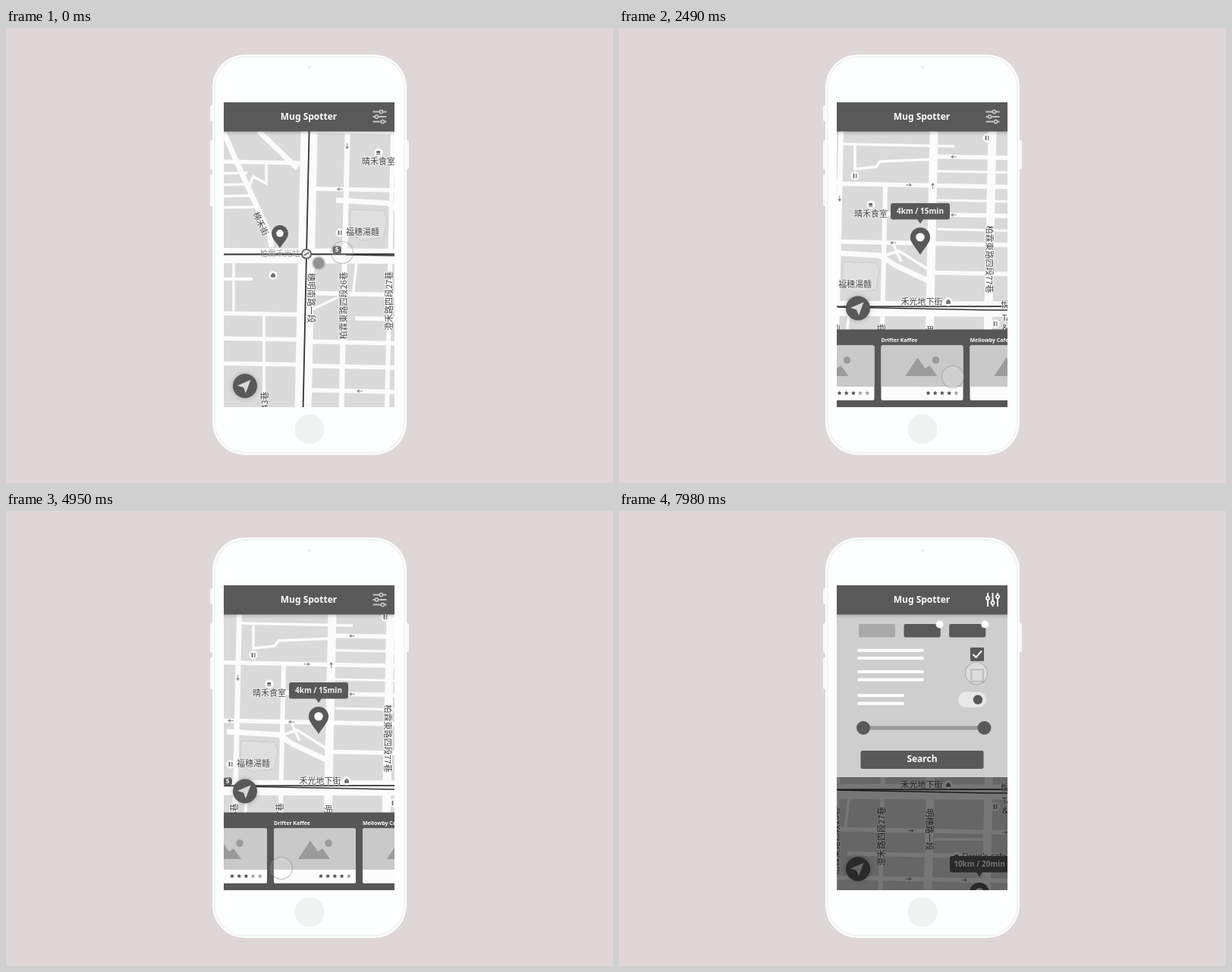
These frames come from a looping animation (800 by 600 pixels, 8000 ms). An HTML page with a canvas:

```html
<!DOCTYPE html>
<html lang="en">
<head>
<meta charset="utf-8">
<title>Cafe map</title>
<style>
html, body { margin: 0; width: 100%; height: 100%; overflow: hidden; background: #dfd6d7; }
canvas { display: block; width: 800px; height: 600px; }
</style>
</head>
<body>
<canvas id="stage" width="800" height="600"></canvas>
<script>
const ctx = document.getElementById('stage').getContext('2d');
const LOOP = 8000, DARK = '#595959', ROAD = '#fbfbfb';
const LATIN = '"Noto Sans", "Open Sans", sans-serif';
const CJK = '"Noto Sans CJK TC", "Noto Sans CJK JP", "Noto Sans CJK", sans-serif';
const RIGHT = 0, DOWN = Math.PI / 2, LEFT = Math.PI, UP = -DOWN;

// Map offset and left edge of the third card: [from, to, x, y, card]
const mapStart = [148, -41, 462.5];
const mapMoves = [
  [0, 680, -58, -18, 462.5],
  [820, 1350, 0, 0, 462.5],
  [1750, 2300, -11, 28, 462.5],
  [2600, 3200, -90, -177, 349],
  [4300, 4950, 4, 23, 470],
  [4950, 5150, -11, 28, 462.5]
];
// Finger: from, to, place, and whether it taps on arrival
const touchStart = [443, 296];
const touchMoves = [
  [0, 690, 328, 277],
  [690, 1300, 386, 295],
  [1300, 1620, 413, 258, 'tap'],
  [1800, 2400, 440, 460],
  [2700, 3200, 367, 468],
  [4300, 4850, 363, 471],
  [5000, 5700, 492, 118, 'tap'],
  [5900, 6550, 468, 166, 'tap'],
  [6720, 7000, 398, 160, 'tap'],
  [7120, 7620, 472, 189, 'tap'],
  [7740, 7960, 471, 214, 'tap']
];

const avenues = [
  { x: 248, width: 22 },
  { x: 298.5, width: 7, name: '柏霖東路四段26巷', nameY: 407, turn: UP, way: DOWN, arrows: [197] },
  { x: 358.5, width: 6, top: 178, name: '澄禾路四段27巷', nameY: 401, turn: UP },
  { x: 421, width: 11, name: '明穗路一段', nameY: 392, turn: DOWN, way: UP, arrows: [180, 510] },
  { x: 498, width: 11, name: '柏霖東路四段77巷', nameY: 277, turn: DOWN }
];
// Cross streets, counted away from the main road in both directions
const northStreets = [
  { from: 425, way: RIGHT, arrows: [536] },
  { from: 253, way: LEFT, arrows: [292, 372] },
  { from: 362, way: LEFT, arrows: [452] },
  { from: 248, way: RIGHT, arrows: [393] },
  { from: 428, way: LEFT, arrows: [452] }
];
const southStreets = [
  { from: 248, to: 560, way: RIGHT, arrows: [396, 520] },
  { from: 312 },
  { from: 248, way: RIGHT, arrows: [393, 466, 551] },
  { from: 248 },
  { from: 248, to: 493, way: LEFT, arrows: [318, 449] },
  { from: 377, way: RIGHT, arrows: [384, 566] }
];
const bends = new Path2D(`M139 179L162 231L199 312L202 330M185 177L236 226M287 268L355 272L375 285L420 306
  M560 397L587 429M563 397L566 492M600 495V580`);
const lanes = new Path2D(`M306 125L453 128M322 127V158L350 155L355 148L428 145M426 405H495M192 418V580M152 350V417
  M195 219V246L178 237L172 250M372 256L383 280M361 272L380 266L418 290M257 411L290 396M314 350L309 395`);
const garden = new Path2D('M306 280L350 282L354 292L350 317L320 321L305 312Z');

const places = [
  { kind: 'fork', x: 292, y: 311, name: '福穗湯麵', dx: 30, dy: -1 },
  { kind: 'cup', x: 343, y: 205, name: '晴禾食室', dx: 0, dy: 12 },
  { kind: 'shop', x: 445, y: 333, name: '禾光地下街', dx: -35, dy: 0 },
  { kind: 'shop', x: 541, y: 324, name: '悅彩名店城', dx: 1, dy: 13 },
  { kind: 'fork', x: 507, y: 362, name: 'TANSEL Cafe\n& Galettes', dx: 9, dy: -7 },
  { kind: 'cup', x: 456, y: 427, name: "Orrin's cafe", dx: 7, dy: 1 },
  { kind: 'fork', x: 322, y: 167 },
  { kind: 'fork', x: 496, y: 117 },
  { kind: 'fork', x: 548, y: 179 },
  { kind: 'shop', x: 204, y: 367 },
  { kind: 'shop', x: 588, y: 518 }
];
const cards = [['Moss Cafe', 3], ['Drifter Kaffee', 4], ['Mellowby Cafe', 4], ['Fenn Cafe', 4]];

const clamp = v => Math.max(0, Math.min(1, v));
const ease = v => v * v * (3 - 2 * v);
const mix = (a, b, k) => a + (b - a) * k;
const ramp = (t, from, to) => ease(clamp((t - from) / (to - from)));
const glide = (start, moves, t) => moves.reduce((pose, [from, to, ...goal]) =>
  pose.map((v, i) => mix(v, goal[i], ramp(t, from, to))), start);

const avenueX = (avenue, y) => avenue.x - (y - 340) * 0.022;
const northY = row => 294 - 38.3 * row;
const southY = row => 393.5 + 32 * row;
const slant = (y, x) => y + (x - 400) * 0.02;

function at(x, y, draw, angle = 0, scale = 1) {
  ctx.save();
  ctx.translate(x, y);
  ctx.rotate(angle);
  ctx.scale(scale, scale);
  draw();
  ctx.restore();
}
function box(x, y, w, h, r, fill) {
  ctx.beginPath();
  ctx.roundRect(x, y, w, h, r);
  ctx.fillStyle = fill;
  ctx.fill();
}
function disc(x, y, r, fill) {
  ctx.beginPath();
  ctx.arc(x, y, r, 0, 7);
  ctx.fillStyle = fill;
  ctx.fill();
}
function shape(points, fill) {
  ctx.beginPath();
  points.forEach(p => ctx.lineTo(...p));
  ctx.closePath();
  ctx.fillStyle = fill;
  ctx.fill();
}
function line(points, width, color) {
  ctx.beginPath();
  points.forEach(p => ctx.lineTo(...p));
  ctx.lineWidth = width;
  ctx.strokeStyle = color;
  ctx.stroke();
}
function strokePath(path, width, color) {
  ctx.lineWidth = width;
  ctx.strokeStyle = color;
  ctx.stroke(path);
}
function text(str, x, y, font, color, align = 'center') {
  ctx.font = font;
  ctx.textAlign = align;
  ctx.textBaseline = 'middle';
  ctx.fillStyle = color;
  ctx.fillText(str, x, y);
}

function drawPhone() {
  ctx.fillStyle = '#dfd6d7';
  ctx.fillRect(0, 0, 800, 600);
  [[269, 102, 21], [269, 148, 39], [269, 193, 42], [526, 148, 38]].forEach(([x, y, h]) => box(x, y, 5, h, 2, '#f8f8f8'));
  box(272, 35, 256, 528, 43, '#fdfefe');
  const rim = new Path2D();
  rim.roundRect(275, 38, 250, 522, 40);
  strokePath(rim, 2, '#f2f4f4');
  disc(400, 52, 2, '#ececec');
  disc(400, 529, 19.5, '#f0f1f1');
}

function drawArrow(x, y, angle) {
  at(x, y, () => {
    line([[-4, 0], [2, 0]], 1.1, '#999');
    shape([[0.5, -2.5], [4, 0], [0.5, 2.5]], '#8c8c8c');
  }, angle);
}
function mapLabel(str, x, y, angle = 0) {
  const latin = /[a-z]/.test(str);
  const font = `11px ${latin ? LATIN : CJK}`, align = latin ? 'left' : 'center';
  at(x, y, () => {
    ctx.font = font;
    ctx.textAlign = align;
    ctx.textBaseline = 'middle';
    ctx.lineWidth = 2;
    ctx.strokeStyle = 'rgba(250,250,250,.6)';
    ctx.strokeText(str, 0, 0);
    text(str, 0, 0, font, '#484848', align);
  }, angle);
}
function drawStreets() {
  const crossings = (rows, yOf) => rows.map((row, i) => ({ ...row, y: yOf(i) }));
  const streets = [...crossings(northStreets, northY), ...crossings(southStreets, southY)];
  const street = (y, from, to, width) => line([[from, slant(y, from)], [to, slant(y, to)]], width, ROAD);
  for (const { y, from, to = 610 } of streets) street(y, from, to, 5.7);
  for (let i = 1; i <= 3; i++) street(northY(i) - 19, 430, 610, 3);
  for (let i = 0; i < 4; i++) line([[130, 233 + 15 * i], [170 + 4 * i, 232 + 15 * i]], 3.5, ROAD);
  for (const y of [217, 417, 450, 483]) line([[130, y], [245, y + 2]], 5.5, ROAD);
  line([[130, 372], [177, 372]], 4, ROAD);
  strokePath(lanes, 3.5, ROAD);
  strokePath(bends, 7, ROAD);
  for (const a of avenues) {
    const top = a.top ?? 90;
    line([[avenueX(a, top), top], [avenueX(a, 580), 580]], a.width, ROAD);
  }
  line([[130, 341], [610, 343]], 20, ROAD);
  line([[130, 339.5], [610, 339]], 1.8, '#333');
  line([[300, 340], [500, 344], [610, 344.5]], 1.5, '#333');
  line([[avenueX(avenues[0], 90), 90], [avenueX(avenues[0], 580), 580]], 1.8, '#333');
  for (const { y, way, arrows = [] } of streets) arrows.forEach(x => drawArrow(x, slant(y, x), way));
  for (const a of avenues) a.arrows?.forEach(y => drawArrow(avenueX(a, y), y, a.way));
}
function drawPlace(kind) {
  disc(0, 0, 5.7, '#fafafa');
  const ink = '#686868';
  if (kind === 'fork') {
    line([[-1.5, -3], [-1.5, 3]], 1.8, ink);
    line([[1.8, -3], [1.8, 3]], 1.2, ink);
  } else if (kind === 'cup') {
    box(-2.8, -2, 5, 3.3, 1, ink);
    line([[-3, 2.5], [2.5, 2.5]], 0.9, ink);
  } else {
    box(-2.8, -0.8, 5.6, 3.6, 0.5, ink);
    shape([[-3.2, -0.6], [0, -3.2], [3.2, -0.6]], ink);
  }
}
function drawPin(x, top, grow) {
  at(x, top, () => {
    ctx.beginPath();
    ctx.arc(0, 11, 11, 2.75, 0.39);
    ctx.bezierCurveTo(7.5, 21, 3, 25, 0, 30.2);
    ctx.bezierCurveTo(-3, 25, -7.5, 21, -10.2, 15.2);
    ctx.fillStyle = DARK;
    ctx.fill();
    disc(0, 10.8, 4.8, '#fff');
  }, 0, 1 + 0.19 * grow);
}
function drawTip(str, x, bottom, k) {
  if (!k) return;
  ctx.globalAlpha = k;
  at(x, bottom, () => {
    box(-39, -28, 78, 21.5, 3, DARK);
    shape([[-4, -7], [4, -7], [0, -1]], DARK);
    text(str, 0, -17, `bold 10px ${LATIN}`, '#f4f4f4');
  }, 0, mix(0.6, 1, k));
  ctx.globalAlpha = 1;
}
function drawMap(t, mapX, mapY) {
  ctx.fillStyle = '#dadada';
  ctx.fillRect(287, 98, 225, 402);
  ctx.save();
  ctx.translate(mapX, mapY);
  box(503, 500, 94, 52, 0, '#d0d0d0');
  ctx.fillStyle = '#dfdfdf';
  ctx.fill(garden);
  strokePath(garden, 1, '#cbcbcb');
  drawStreets();
  box(282.5, 328.5, 11.5, 10.5, 4, '#585858');
  text('5', 288, 334, `bold 8px ${LATIN}`, '#fff');
  text('柏霖禾光站', 213, 338, `10.5px ${CJK}`, '#929292');
  disc(248, 339, 7, '#666');
  disc(248, 339, 5, '#eee');
  line([[245, 341], [251, 337]], 2, '#777');
  disc(264, 351, 9.5, 'rgba(120,120,120,.25)');
  disc(264, 351, 7.5, '#929292');
  for (const { kind, x, y, name = '', dx, dy } of places) {
    at(x, y, () => drawPlace(kind));
    name.split('\n').forEach((row, i) => mapLabel(row, x + dx, y + dy + 13 * i));
  }
  for (const a of avenues) if (a.name) mapLabel(a.name, avenueX(a, a.nameY), a.nameY, a.turn);
  mapLabel('穗明南路一段', 254, 397, DOWN);
  mapLabel('棉禾街', 188, 299, 1.13);
  mapLabel('43巷', 193, 532, UP);
  const near = ramp(t, 1730, 1980), far = ramp(t, 2950, 3180);
  drawPin(213, 301, 0);
  drawPin(mix(414, 408, near), mix(241, 235, near), near);
  drawPin(486, mix(463, 462, far), far);
  drawTip('4km / 15min', 408, 231, near);
  drawTip('10km / 20min', 486, 455, far);
  ctx.restore();
}

function drawLocate(rise) {
  at(315, 472 - 102.5 * rise, () => {
    ctx.shadowColor = 'rgba(0,0,0,.25)';
    ctx.shadowBlur = 6;
    disc(0, 0, 16, DARK);
    ctx.shadowBlur = 0;
    shape([[7.5, -8], [-10, -0.5], [-2, 2], [1, 9.5]], '#d8d8d8');
  });
}
function drawStar(x, y, fill) {
  shape(Array.from({ length: 10 }, (_, i) => {
    const a = i * Math.PI / 5 - Math.PI / 2, r = i % 2 ? 1.6 : 3;
    return [x + r * Math.cos(a), y + r * Math.sin(a)];
  }), fill);
}
function drawCards(cardX, rise) {
  if (!rise) return;
  ctx.save();
  ctx.translate(0, 102.5 * (1 - rise));
  ctx.fillStyle = '#575757';
  ctx.fillRect(287, 397.5, 225, 103);
  cards.forEach(([name, stars], i) => at(cardX + (i - 2) * 117, 0, () => {
    text(name, 0, 412, `bold 7px ${LATIN}`, '#fff', 'left');
    box(0, 418.5, 108, 72.5, 2, '#fcfcfc');
    box(0, 418.5, 108, 54.5, [2, 2, 0, 0], '#c9c9c9');
    shape([[32, 459], [48, 434.5], [58, 449], [64, 445], [74, 459]], '#9b9b9b');
    disc(72, 438, 4.8, '#9b9b9b');
    for (let s = 0; s < 5; s++) drawStar(62 + s * 9.2, 481.5, s < stars ? '#555' : '#a2a2a2');
  }));
  ctx.restore();
}

function drawCheck(x, y, k) {
  ctx.strokeStyle = '#a2a2a2';
  ctx.lineWidth = 2.2;
  ctx.strokeRect(x - 7.8, y - 7.8, 15.6, 15.6);
  if (!k) return;
  ctx.globalAlpha = k;
  box(x - 9, y - 9, 18, 18, 1.5, DARK);
  line([[x - 5.5, y], [x - 1.5, y + 4], [x + 6, y - 4.5]], 2, '#fff');
  ctx.globalAlpha = 1;
}
function drawFilter(t, open) {
  if (!open) return;
  ctx.fillStyle = `rgba(0,0,0,${0.53 * open})`;
  ctx.fillRect(287, 136, 225, 364);
  ctx.save();
  ctx.translate(0, -215 * (1 - open));
  ctx.fillStyle = '#cecece';
  ctx.fillRect(287, 136, 225, 215);
  const chosen = [0, ramp(t, 7070, 7200), ramp(t, 6650, 6780)];
  chosen.forEach((k, i) => {
    const x = 316 + i * 59.6;
    box(x, 149, 48, 17.5, 2, '#a9a9a9');
    if (!k) return;
    ctx.globalAlpha = k;
    box(x, 149, 48, 17.5, 2, DARK);
    ctx.globalAlpha = 1;
    disc(x + 47, 149.5, 5 * k, '#fff');
  });
  for (const [y, width] of [[181.7, 88], [210, 88], [241.3, 62]]) {
    box(314, y, width, 4, 2, '#fff');
    box(314, y + 10.4, width, 4, 2, '#fff');
  }
  drawCheck(472, 189, ramp(t, 7680, 7780));
  drawCheck(472, 217, 0);
  box(447, 238.5, 37, 20.5, 10.2, '#e8e8e8');
  disc(473, 248.8, 6.2, DARK);
  line([[322, 286], [481, 286]], 5, '#989898');
  disc(322, 286, 9, DARK);
  disc(481.5, 286, 9, DARK);
  box(318.5, 316, 162, 24, 2.5, DARK);
  text('Search', 399.5, 327.5, `bold 12px ${LATIN}`, '#fff');
  ctx.restore();
}

function drawHeader(open) {
  const shade = ctx.createLinearGradient(0, 136, 0, 142);
  shade.addColorStop(0, 'rgba(0,0,0,.16)');
  shade.addColorStop(1, 'rgba(0,0,0,0)');
  ctx.fillStyle = shade;
  ctx.fillRect(287, 136, 225, 6);
  ctx.fillStyle = DARK;
  ctx.fillRect(287, 98, 225, 38.5);
  text('Mug Spotter', 399, 117.5, `bold 12px ${LATIN}`, '#fff');
  const tone = Math.round(mix(195, 255, open)), ink = `rgb(${tone},${tone},${tone})`;
  at(492.5, 117, () => {
    [2, -4, 4].forEach((knob, i) => {
      const y = (i - 1) * 6.5;
      line([[-9, y], [9, y]], 2, ink);
      disc(knob, y, 2.9, ink);
      disc(knob, y, 1.2, DARK);
    });
  }, -open * Math.PI / 2);
}
function drawTouch(t) {
  const [x, y] = glide(touchStart, touchMoves, t);
  const press = Math.max(...touchMoves.filter(move => move[4]).map(move => clamp(1 - Math.abs(t - move[1] - 60) / 200)));
  disc(x, y, 14.5, `rgba(255,255,255,${0.12 + 0.24 * press})`);
  ctx.strokeStyle = 'rgba(130,130,130,.45)';
  ctx.lineWidth = 1.1;
  ctx.stroke();
}

function render(now) {
  const t = now % LOOP;
  const rise = ramp(t, 1850, 2300) - ramp(t, 5150, 5600);
  const open = ramp(t, 5850, 6400);
  const [mapX, mapY, cardX] = glide(mapStart, mapMoves, t);
  drawPhone();
  ctx.save();
  ctx.beginPath();
  ctx.rect(287, 98, 225, 402);
  ctx.clip();
  drawMap(t, mapX, mapY);
  drawLocate(rise);
  drawCards(cardX, rise);
  drawFilter(t, open);
  drawHeader(open);
  ctx.restore();
  drawTouch(t);
}
let start;
function tick(now) {
  start ??= now;
  render(now - start);
  requestAnimationFrame(tick);
}
render(0);
requestAnimationFrame(tick);
</script>
</body>
</html>
```
